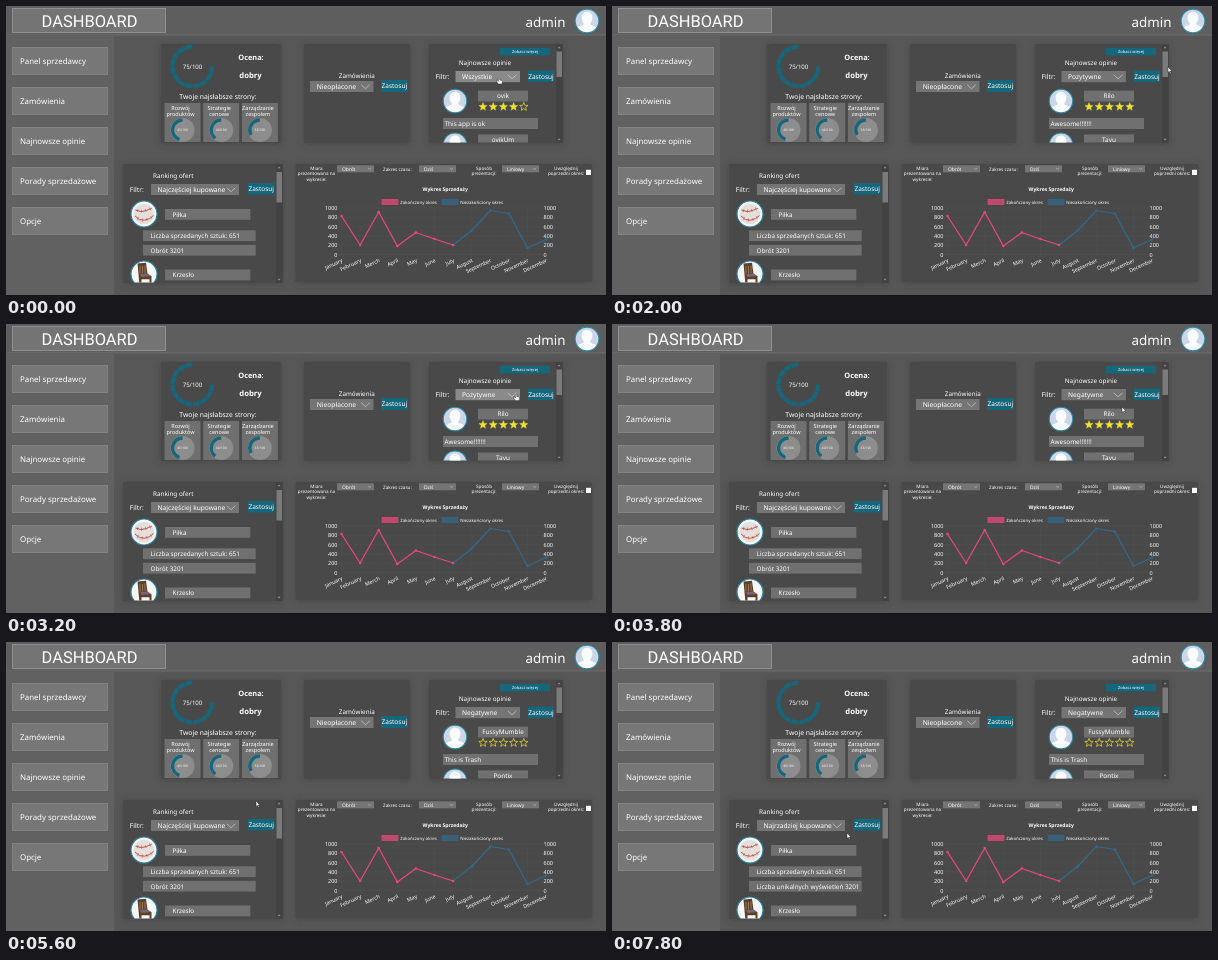
Recreate the animation shown at these times as an HTML page. Size 600 by 290 pixels, loop 8 s.

```html
<!DOCTYPE html>
<html lang="pl">
<head>
<meta charset="utf-8">
<title>Dashboard</title>
<style>
html, body { margin: 0; width: 100%; height: 100%; overflow: hidden; background: #575757; }
svg { display: block; width: 100%; height: 100%; }
text { font-family: "Noto Sans", "Open Sans", sans-serif; fill: #fff; text-rendering: geometricPrecision; }
</style>
</head>
<body>
<svg id="stage" viewBox="0 0 600 290"></svg>
<script>
const LOOP = 8000, STEP = 200, HOLD = 800;
const TEAL = '#17677c', BOX = '#707070', FIELD = '#757575', HOVER = '#8a8a8a';
const YELLOW = '#efe12f', PINK = '#e8477a', BLUE = '#32698a';

const rect = (x, y, x2, y2, fill, more = '') =>
  `<rect x="${x}" y="${y}" width="${x2 - x}" height="${y2 - y}" fill="${fill}" ${more}/>`;
const text = (x, y, size, str, anchor = 'start', more = '') =>
  `<text x="${x}" y="${y}" font-size="${size}" text-anchor="${anchor}" ${more}>${str}</text>`;
const mid = (x, y, size, str, more) => text(x, y, size, str, 'middle', more);
const line = (d, color, w, more = '') =>
  `<path d="${d}" fill="none" stroke="${color}" stroke-width="${w}" ${more}/>`;
const circle = (x, y, r, fill, more = '') =>
  `<circle cx="${x}" cy="${y}" r="${r}" fill="${fill}" ${more}/>`;

const button = (x, y, x2, y2, size, str) =>
  rect(x, y, x2, y2, TEAL) + mid((x + x2) / 2, (y + y2) / 2 + size * .36, size, str);

function select(x, y, x2, y2, size, str, id = '', w = 4.3) {
  const cx = x2 - w - size * .55, cy = (y + y2) / 2;
  return rect(x, y, x2, y2, FIELD, id && `id="${id}Box"`) +
    text(x + size, cy + size * .36, size, str, 'start', id && `id="${id}"`) +
    line(`M${cx - w} ${cy - w * .4}l${w} ${w * .9}l${w} ${-w * .9}`, '#c8c8c8', size * .12);
}

function scrollbar(x, y, y2, top, bottom, id = '') {
  const cx = x + 3;
  return rect(x, y, x + 6.5, y2, '#424242') +
    rect(x + .5, top, x + 6, bottom, '#7b7b7b', id && `id="${id}"`) +
    `<path d="M${cx - 1.3} ${y + 4.2}h2.8l-1.4-1.8zM${cx - 1.3} ${y2 - 4.2}h2.8l-1.4 1.8z" fill="#999"/>`;
}

// Arc running counterclockwise from the top, share in 0..1
function arc(cx, cy, r, share, w, more) {
  const a = -share * 2 * Math.PI;
  return line(`M${cx} ${cy - r}A${r} ${r} 0 ${share > .5 ? 1 : 0} 0 ${cx + r * Math.sin(a)} ${cy - r * Math.cos(a)}`, TEAL, w, more);
}

function avatar(x, y, r) {
  return `<g transform="translate(${x} ${y}) scale(${r / 12})">` +
    circle(0, 0, 11.5, '#ccd6e6') +
    `<path d="M-9.2 7C-7.5 4-3.2 4.6-3 2.6C-7-2-5.6-9 0-9S7-2 3 2.6C3.2 4.6 7.5 4 9.2 7A11.5 11.5 0 0 1-9.2 7z" fill="#fbfcfe"/>` +
    circle(0, 0, 11.5, 'none', 'stroke="#2487a0" stroke-width="1"') + '</g>';
}

function star(x, y, full) {
  let d = '';
  for (let i = 0; i < 10; i++) {
    const a = i * Math.PI / 5, r = i % 2 ? 1.9 : 4.4;
    d += `${i ? 'L' : 'M'}${(x + r * Math.sin(a)).toFixed(2)} ${(y - r * Math.cos(a)).toFixed(2)}`;
  }
  return `<path d="${d}z" fill="${full ? YELLOW : 'none'}" stroke="${YELLOW}" stroke-width="${full ? .3 : .7}"/>`;
}

function review(dy, name, stars, words) {
  let s = avatar(449, 95 + dy, 12.3) + rect(472, 84.7 + dy, 522, 95.5 + dy, BOX) + mid(497, 92.4 + dy, 6.4, name);
  for (let i = 0; i < 5; i++) s += star(477 + i * 10.2, 100.8 + dy, i < stars);
  return s + rect(437, 112 + dy, 532, 123 + dy, BOX) + text(438.5, 119.8 + dy, 6.4, words);
}

const LISTS = [
  [['ovik', 4, 'This app is ok'], ['ovikUm', 4, 'Fine']],
  [['Rilo', 5, 'Awesome!!!!!!!'], ['Tavu', 5, 'Great']],
  [['FussyMumble', 0, 'This is Trash'], ['Pontix', 0, 'Bad']]
];

function header() {
  return rect(0, 0, 600, 29, '#5e5e5e') + rect(0, 28.6, 600, 29.4, '#727272') +
    rect(6.5, 2.5, 159.5, 26.5, '#747474', 'stroke="#8f8f8f"') +
    text(35.6, 21, 16.45, 'DASHBOARD', 'start', 'style="font-family:Roboto,sans-serif"') +
    text(519.5, 20.6, 13.4, 'admin') + avatar(581, 15, 12.4);
}

function sidebar() {
  const items = ['Panel sprzedawcy', 'Zamówienia', 'Najnowsze opinie', 'Porady sprzedażowe', 'Opcje'];
  return rect(0, 29.4, 108, 289, '#616161') + items.map((s, i) =>
    rect(6.5, 41.5 + i * 40, 101.5, 68.5 + i * 40, '#777', 'stroke="#8a8a8a" stroke-width=".8"') +
    text(14, 58 + i * 40, 7.9, s)).join('');
}

const panel = (x, y, x2, y2) => rect(x, y, x2, y2, '#494949', 'filter="url(#soft)"');

function rating() {
  const weak = [['Rozwój', 'produktów', 45], ['Strategie', 'cenowe', 40], ['Zarządzanie', 'zespołem', 33]];
  return panel(155, 38, 275, 137) +
    arc(186.3, 60.5, 19.8, .75, 4.2, 'stroke-dasharray="7 .8"') +
    mid(186.5, 62.7, 6.1, '75/100') +
    mid(245, 54, 7.4, 'Ocena:', 'font-weight="700"') + mid(244.5, 72, 7.7, 'dobry', 'font-weight="700"') +
    mid(212, 92.7, 6.8, 'Twoje najsłabsze strony:') +
    weak.map(([a, b, n], i) => {
      const x = 176.5 + i * 38.7;
      return rect(x - 18, 97, x + 18, 136, '#6f6f6f') + mid(x - 2, 104, 5.6, a) + mid(x - 2, 110, 5.5, b) +
        circle(x, 124, 12, '#8d8d8d') + arc(x, 124, 10, n / 100, 3.4) + mid(x, 125.2, 3.3, n + '/100');
    }).join('');
}

function orders() {
  return panel(298, 38, 404, 137) + mid(350.8, 72.4, 6.3, 'Zamówienia') +
    select(304, 75, 367.5, 86, 6.7, 'Nieopłacone') + button(375, 74, 401.7, 86, 6.5, 'Zastosuj');
}

function opinions() {
  return panel(423, 38, 557, 137) + '<g clip-path="url(#opClip)"><g id="opBody">' +
    button(494, 41.8, 544, 49.5, 4, 'Zobacz więcej') + mid(479, 58.6, 6.35, 'Najnowsze opinie') +
    text(429.5, 73, 6.8, 'Filtr:') + select(449.5, 65, 514, 76.2, 6.6, '', 'opFilter') +
    button(522, 64.5, 548, 76, 6.5, 'Zastosuj') +
    LISTS.map((l, i) => `<g id="list${i}">` + l.map((r, k) => review(k * 43.7, ...r)).join('') + '</g>').join('') +
    '</g></g>' + scrollbar(550, 38, 137, 45.5, 71, 'thumb');
}

const frameCircle = (x, y) => circle(x, y, 13, '#f7f7f7', 'stroke="#2487a0" stroke-width="1.1"');

function offers() {
  const row = (x, y, x2, str, id = '') => rect(x, y, x2, y + 10.8, BOX) + text(x + 7.5, y + 7.8, 6.35, str, 'start', id && `id="${id}"`);
  return panel(117, 158, 277, 277) + '<g clip-path="url(#offerClip)">' +
    text(147, 172.1, 6.35, 'Ranking ofert') + text(123.7, 186, 6.8, 'Filtr:') +
    select(145, 178, 233, 189, 6.6, '', 'offerFilter') + button(242, 177, 268.5, 188.5, 6.5, 'Zastosuj') +
    frameCircle(138, 208) + circle(138, 208, 10.3, '#e4dfdb') +
    line('M129.5 204q6 3 11 .5t5.5-2M129 210q4 5 9.5 4.2t9-4.7', '#c0504c', 1) +
    line('M132 203l-.6 3M135.5 203.5v3.2M139.5 203l.6 3M143.5 201.5l1 2.8M132.5 211l-1.2 2.8M136.5 212.6l-.3 3M140.5 212.2l.7 2.8M144.2 210.3l1.4 2.3', '#c0504c', .6) +
    row(159, 203, 244.3, 'Piłka') + row(137, 224.3, 249.7, 'Liczba sprzedanych sztuk: 651') +
    row(137, 238.8, 249.7, '', 'stat') +
    frameCircle(138, 268) +
    '<path d="M131.5 257.5l8.5-.8 1.5 11 4 2.5v9h-2v-6h-8v6h-2z" fill="#5d4029"/>' +
    '<path d="M134 268l7.5-.5 3.5 2.6-9.5 1z" fill="#77657a"/>' +
    line('M134 260v7.5M136.5 260v7.5M139 259.5v7.5', '#b39478', .7) +
    row(159, 263.5, 244.3, 'Krzesło') + '</g>' + scrollbar(270, 158, 277, 166, 196.5);
}

function chart() {
  const months = 'January February Merch April May June July August September October November December'.split(' ');
  const ys = [210, 239, 206, 240, 226.5, 233, 239, 224.5, 204.5, 207.5, 242, 233.5];
  const px = i => 335.5 + i * 18.6;
  const plot = (from, to, color) => {
    let d = '', dots = '';
    for (let i = from; i <= to; i++) {
      d += `${i > from ? 'L' : 'M'}${px(i)} ${ys[i]}`;
      dots += circle(px(i), ys[i], 1.3, color);
    }
    return line(d, color, 1.25, 'stroke-linejoin="round"') + dots;
  };
  const label = (x, lines) => lines.map((s, i) => mid(x, 163.8 + i * 5.4, 4.6, s)).join('');
  const choice = (x, str) => select(x, 159.3, x + 37, 166.3, 4.9, str, '', 1.6);
  const legend = (x, color, str) =>
    rect(x, 193.3, x + 16, 198.5, color, 'fill-opacity=".75" stroke="' + color + '" stroke-width=".6"') + text(x + 18.2, 197.5, 4.35, str);

  let s = panel(289.5, 158, 586, 276) +
    label(310.5, ['Miara', 'prezentowana na', 'wykresie:']) + choice(331, 'Obrót') +
    text(377, 164.8, 4.6, 'Zakres czasu:') + choice(413, 'Dziś') +
    label(478, ['Sposób', 'prezentacji:']) + choice(496, 'Liniowy') +
    label(560, ['Uwzględnij', 'poprzedni okres:']) + rect(580, 163.8, 585, 169, '#fff') +
    mid(439.2, 185.3, 5.05, 'Wykres Sprzedaży', 'font-weight="700"') +
    legend(376, PINK, 'Zakończony okres') + legend(436, BLUE, 'Niezakończony okres');
  for (let i = 0; i < 6; i++) {
    const y = 202 + i * 9.3, n = 1000 - i * 200;
    s += line(`M332 ${y}H540`, '#555', .4) + text(331.5, y + 2.1, 5.5, n, 'end') + text(537.5, y + 2.1, 5.5, n);
  }
  months.forEach((m, i) => {
    const x = px(i);
    s += line(`M${x} 202V250.5`, '#515151', .4) +
      text(x + 1.5, 255.7, 5.3, m, 'end', `transform="rotate(-25 ${x + 1.5} 255.7)"`);
  });
  return s + plot(6, 11, BLUE) + plot(0, 6, PINK);
}

const stage = document.getElementById('stage');
stage.innerHTML = `<defs>
  <filter id="soft" x="-15%" y="-15%" width="130%" height="130%"><feDropShadow dx="0" dy="1" stdDeviation="3" flood-color="#3c3c3c" flood-opacity=".6"/></filter>
  <clipPath id="opClip"><rect x="423" y="38" width="127" height="98.5"/></clipPath>
  <clipPath id="offerClip"><rect x="117" y="158" width="153" height="118.5"/></clipPath></defs>` +
  rect(0, 0, 600, 290, '#575757') + rating() + orders() + opinions() + offers() + chart() + header() + sidebar() +
  rect(0, 289, 600, 290, '#161616') +
  `<g id="cursor" stroke="#222" stroke-width=".45" stroke-linejoin="round" fill="#fff">
  <path id="arrow" d="M0 0V5.4L1.3 4.3L2.2 6.3L3.1 5.9L2.2 4H3.9z"/>
  <path id="hand" d="M-.7 .5Q0-.5 .7 .5V2.4L3 3Q3.6 3.3 3.4 4.2L2.9 6.6H-.6L-2.2 4.2Q-2-.0 -.7 4z"/></g>`;

const $ = id => document.getElementById(id);

// Keys: time, then values
const PATH = [
  [0, 493, 71.5], [800, 493, 73], [1200, 497, 93], [1600, 536, 71], [1800, 552, 67], [2000, 556, 61],
  [2400, 556, 66], [2600, 556, 65], [3000, 555, 61], [3200, 510, 70], [3400, 490, 71], [3800, 510, 83],
  [4000, 536, 71], [4200, 537, 71], [4400, 555, 61], [4800, 556, 66], [5000, 556, 61], [5400, 508, 69],
  [5600, 250, 159], [6000, 224, 183], [6400, 200, 195], [6800, 258, 183], [7000, 267.5, 182],
  [7200, 262, 183], [7400, 224, 183], [7600, 215, 196], [7800, 235, 191]
];
const SCROLL = [[0, 0], [2000, 0], [2400, 16.5], [2600, 16.5], [3000, 0], [4400, 0], [4800, 16.5], [5200, 0]];

function at(keys, t) {
  const i = keys.findIndex(k => k[0] > t);
  if (i < 0) return keys[keys.length - 1].slice(1);
  const a = keys[i - 1], b = keys[i], p = (t - a[0]) / (b[0] - a[0]);
  return a.slice(1).map((v, k) => v + (b[k + 1] - v) * p);
}

const OP_SELECT = [449, 65, 514, 76], OFFER_SELECT = [145, 178, 233, 189];
const BUTTONS = [[522, 64, 548, 76], [242, 177, 269, 188]];

function draw(time) {
  let t = Math.floor(time % LOOP / STEP) * STEP;
  if (t < HOLD) t = 0;
  const [x, y] = at(PATH, t), [scroll] = at(SCROLL, t);
  const over = ([a, b, c, d]) => x > a && x < c && y > b && y < d;
  const hot = [OP_SELECT, OFFER_SELECT, ...BUTTONS].some(over);
  const shown = t < 1800 ? 0 : t < 4200 ? 1 : 2;

  $('cursor').setAttribute('transform', `translate(${x} ${y})`);
  $('arrow').style.display = hot ? 'none' : '';
  $('hand').style.display = hot ? '' : 'none';
  $('opFilterBox').setAttribute('fill', over(OP_SELECT) ? HOVER : FIELD);
  $('offerFilterBox').setAttribute('fill', over(OFFER_SELECT) ? HOVER : FIELD);
  $('opBody').setAttribute('transform', `translate(0 ${-scroll})`);
  $('thumb').setAttribute('y', 45.5 + scroll * .36);
  LISTS.forEach((_, i) => $('list' + i).style.display = i === shown ? '' : 'none');
  $('opFilter').textContent = t < 1000 ? 'Wszystkie' : t < 3600 ? 'Pozytywne' : 'Negatywne';
  $('offerFilter').textContent = t < 7600 ? 'Najczęściej kupowane' : 'Najrzadziej kupowane';
  $('stat').textContent = t < 7600 ? 'Obrót 3201' : 'Liczba unikalnych wyświetleń 3201';
}

const start = performance.now();
function tick() {
  draw(performance.now() - start);
  requestAnimationFrame(tick);
}
tick();
</script>
</body>
</html>
```
